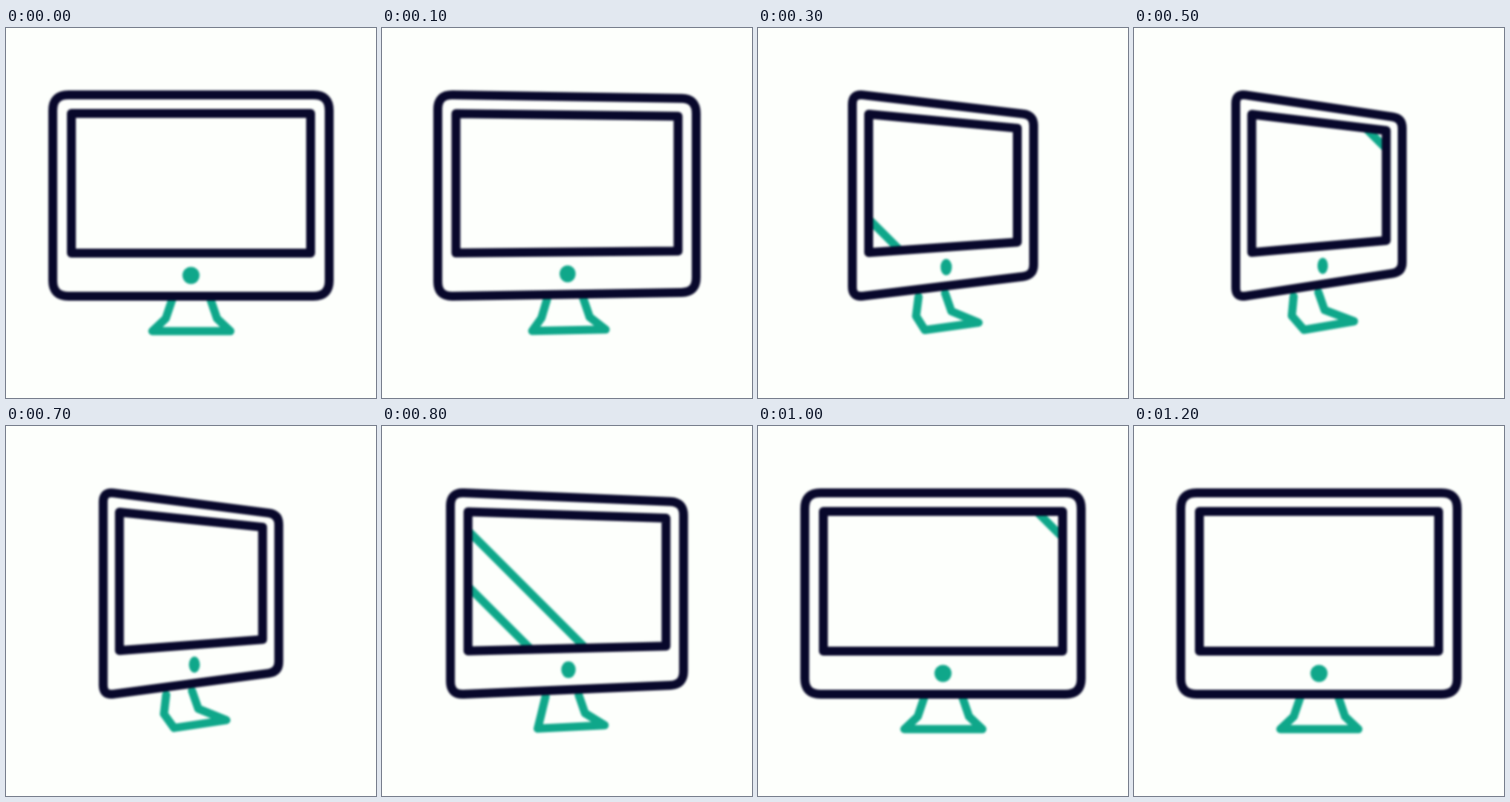
Write an HTML page that moves like this. It is 498 by 498 pixels and loops after 1250 ms.

```html
<!DOCTYPE html>
<html lang="en">
<head>
<meta charset="utf-8">
<title>Turning monitor</title>
<style>
  html, body { margin: 0; width: 100%; height: 100%; overflow: hidden; background: #fdfffc; }
  svg { display: block; width: 100vw; height: 100vh; }
  .line { fill: none; stroke-width: 12; stroke-linejoin: round; stroke-linecap: round; }
  .navy { stroke: #08082b; }
  .green { stroke: #0fa78a; stroke-width: 11; }
</style>
</head>
<body>
<svg viewBox="0 0 498 498">
  <defs>
    <clipPath id="glass"><path id="glassPath"/></clipPath>
    <filter id="soft" filterUnits="userSpaceOnUse" x="0" y="0" width="498" height="498" color-interpolation-filters="sRGB">
      <feGaussianBlur stdDeviation="1.7"/>
    </filter>
  </defs>
  <rect width="498" height="498" fill="#fdfffc"/>
  <g filter="url(#soft)">
    <path id="stand" class="line green"/>
    <g clip-path="url(#glass)"><path id="glare" class="line green"/></g>
    <path id="screen" class="line navy"/>
    <path id="body" class="line navy"/>
    <ellipse id="dot" fill="#0fa78a"/>
  </g>
</svg>
<script>
const LOOP = 1250, STEP = 50;
const MID = 249, HORIZON = 223, TURNED_HALF = 112;
const GLARE_GAP = 75, GLARE_SPEED = 1.8;

const $ = id => document.getElementById(id);
const mix = (a, b, p) => a + (b - a) * p;
const unit = x => Math.min(1, Math.max(0, x));
const smooth = x => x * x * (3 - 2 * x);
const smoother = x => x * x * x * (x * (6 * x - 15) + 10);
const poly = pts => "M" + pts.map(q => q.join(" ")).join("L");

function set(id, attrs) {
  for (const key in attrs) $(id).setAttribute(key, attrs[key]);
}

// 0 = facing front, 1 = fully turned
function turn(t) {
  return t < 600 ? smooth(unit(t / 390)) : 1 - smoother(unit((t - 630) / 305));
}

// Heights shrink toward the horizon as u runs from -1 (near) to 1 (far).
function recede(y, u, p) {
  return HORIZON + (y - HORIZON) * (1 - p * (0.112 + 0.125 * u));
}

// Upright rectangle whose half width narrows while it turns
function panel(front, turned, top, bottom, p) {
  const half = mix(front, turned, p), u = turned / TURNED_HALF;
  const at = (side, y) => [MID + side * half, recede(y, side * u, p)];
  return [at(-1, top), at(1, top), at(1, bottom), at(-1, bottom)];
}

// One height of the stand: its left and right points
function level(half, y, shift, p) {
  const w = half * mix(1, 0.64, p);
  return [-1, 1].map(side =>
    [MID + 0.5 + shift * p + side * w, y - p * (7.5 + side * half * 0.11)]);
}

function stand(p) {
  const [a, b] = level(26, 366, -18, p);
  const [c, d] = level(34.5, 391, -15, p);
  const [e, f] = level(52.5, 408, 13, p);
  return [a, c, e, f, d, b];
}

function toward(a, b, d) {
  const k = d / Math.hypot(b[0] - a[0], b[1] - a[1]);
  return [mix(a[0], b[0], k), mix(a[1], b[1], k)];
}

function rounded(pts, d) {
  const n = pts.length;
  return pts.map((q, i) => {
    const start = toward(q, pts[(i + n - 1) % n], d);
    const end = toward(q, pts[(i + 1) % n], d);
    return `${i ? "L" : "M"}${start}Q${q} ${end}`;
  }).join("") + "Z";
}

// Value of x - y along the rear stripe; it sweeps once per turn
function glareAt(t) {
  return t < 620 ? 177 + GLARE_SPEED * (t - 500) : 80 + GLARE_SPEED * (t - 900);
}

function draw(t) {
  const p = turn(t), c = glareAt(t);
  const screen = poly(panel(161, 90.5, 115, 303, p)) + "Z";
  set("body", { d: rounded(panel(186, TURNED_HALF, 90, 361, p), mix(21, 13, p)) });
  set("screen", { d: screen });
  set("glassPath", { d: screen });
  set("stand", { d: poly(stand(p)) });
  set("dot", {
    cx: MID + 5 * p, cy: recede(333, 0.04, p),
    rx: mix(11.5, 7, p), ry: 11.5 - 0.5 * p
  });
  set("glare", {
    d: [c, c + GLARE_GAP].map(k => poly([[k + 60, 60], [k + 360, 360]])).join("")
  });
}

const begin = performance.now();
function tick() {
  const t = (performance.now() - begin) % LOOP;
  draw(Math.floor(t / STEP) * STEP);
  requestAnimationFrame(tick);
}
draw(0);
requestAnimationFrame(tick);
</script>
</body>
</html>
```
